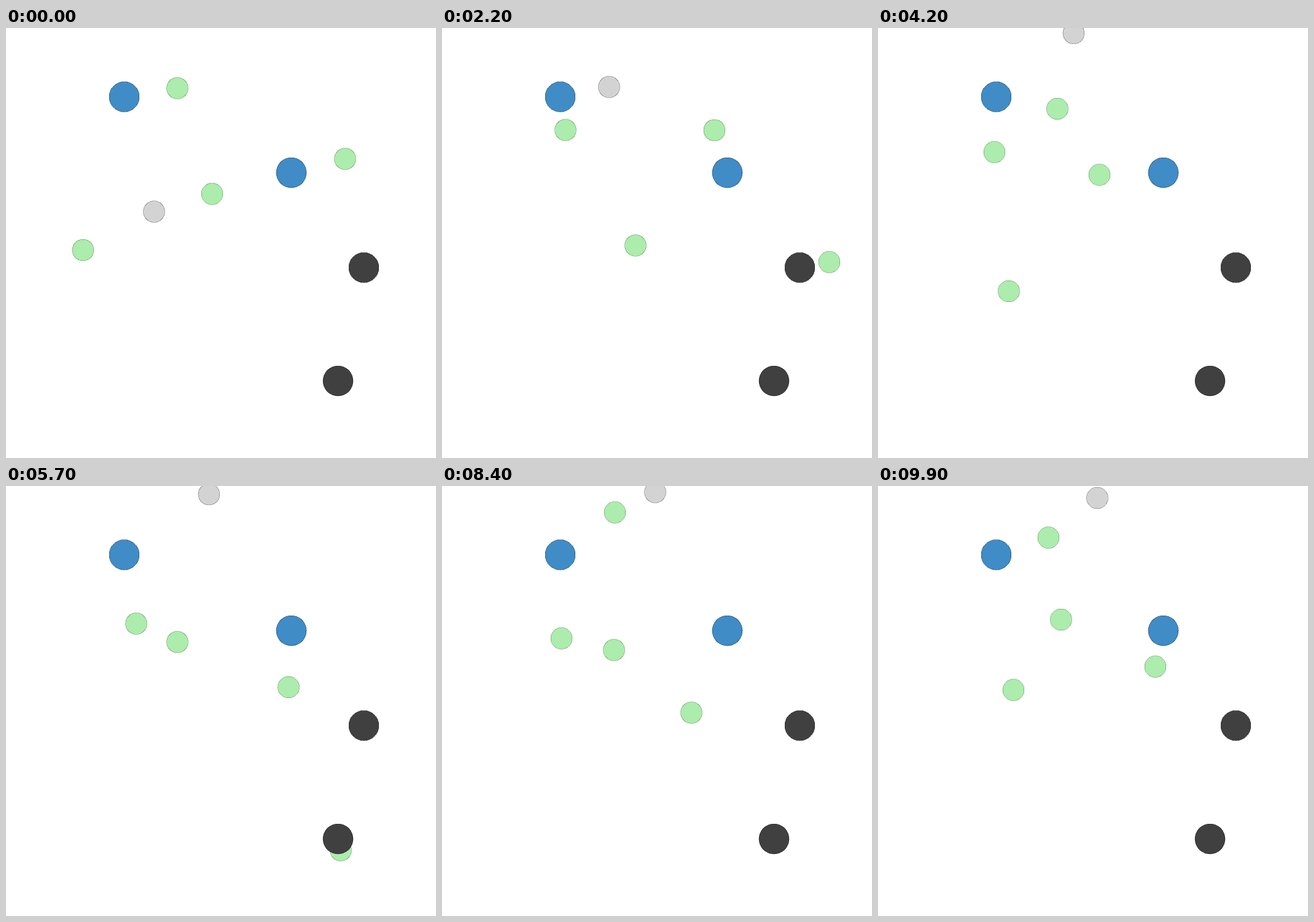
An HTML page that plays this animation: 700x700 px, repeating every 10000 ms.

```html
<!DOCTYPE html>
<html lang="en">
<head>
<meta charset="utf-8">
<title>Moving particles</title>
<style>
  html, body { margin: 0; width: 100%; height: 100%; overflow: hidden; background: #fff; }
  svg { display: block; width: 100vw; height: 100vh; }
  circle { shape-rendering: crispEdges; }
  .runner { fill: rgb(172, 236, 172); stroke: rgba(45, 108, 45, .4); }
  .chaser { fill: rgb(211, 211, 211); stroke: rgba(64, 64, 64, .4); }
  .goal { fill: rgb(64, 140, 199); stroke: rgba(31, 70, 99, .6); }
  .block { fill: rgb(64, 64, 64); stroke: rgba(32, 32, 32, .5); }
</style>
</head>
<body>
<svg id="stage" viewBox="0 0 700 700"></svg>
<script>
const LOOP = 10000, STEP = 100;
const AGENT_RADIUS = 17.5, LANDMARK_RADIUS = 24.5;
const CROWD = [330, 260];
const stage = document.getElementById('stage');

// All agents share these key steps; swing is how far they stray between them.
const keySteps = [0, 22, 42, 57, 70, 84, 99];
const agents = [
  { kind: 'chaser', swing: 0, path: [
    [241, 299], [272, 96], [318.5, 8.5], [330.5, 13.5], [338, 3], [347, 10], [357, 19.5]] },
  { kind: 'runner', swing: 10, path: [
    [279, 98], [201, 166], [189.5, 202], [212, 224], [239, 236.5], [194.5, 248], [298, 217.5]] },
  { kind: 'runner', swing: 50, path: [
    [552, 213], [443.5, 166.5], [292, 131.5], [460, 327.5], [344, 278.5], [280, 267], [451.5, 294]] },
  { kind: 'runner', swing: 150, path: [
    [335.5, 270], [315, 354], [213, 428.5], [545, 593], [428, 200], [406, 369], [220.5, 332]] },
  { kind: 'runner', swing: 150, path: [
    [125.5, 361.5], [630.5, 381], [360.5, 239], [279, 254], [304.5, 473], [281.5, 43], [277.5, 84]] }
];

const landmarks = [
  ['goal', 192.5, 112], ['goal', 464.5, 235.5],
  ['block', 582.5, 390], ['block', 540.5, 574.5]
];

function addCircle(kind, radius, [x, y]) {
  const circle = document.createElementNS('http://www.w3.org/2000/svg', 'circle');
  circle.setAttribute('class', kind);
  circle.setAttribute('r', radius);
  stage.append(circle);
  place(circle, [x, y]);
  return circle;
}

function place(circle, [x, y]) {
  circle.setAttribute('cx', x);
  circle.setAttribute('cy', y);
}

function tangent(path, i, axis) {
  const a = Math.max(i - 1, 0), b = Math.min(i + 1, path.length - 1);
  return (path[b][axis] - path[a][axis]) / (keySteps[b] - keySteps[a]);
}

// A smooth curve through the key points, pushed away from the crowd mid-leg.
function positionAt({ path, swing }, step) {
  const i = Math.max(0, keySteps.findIndex(key => key >= step) - 1);
  const from = path[i], to = path[i + 1], span = keySteps[i + 1] - keySteps[i];
  const u = (step - keySteps[i]) / span, v = 1 - u;
  const outward = CROWD.map((c, axis) => (from[axis] + to[axis]) / 2 - c);
  const push = swing * Math.sin(Math.PI * u) ** 2 / Math.hypot(...outward);
  return outward.map((direction, axis) =>
    from[axis] * v * v * (1 + 2 * u) + to[axis] * u * u * (1 + 2 * v)
    + span * u * v * (v * tangent(path, i, axis) - u * tangent(path, i + 1, axis))
    + push * direction);
}

function render(time) {
  const step = Math.floor((time % LOOP) / STEP);
  for (const agent of agents) place(agent.circle, positionAt(agent, step));
}

for (const agent of agents) agent.circle = addCircle(agent.kind, AGENT_RADIUS, agent.path[0]);
for (const [kind, ...center] of landmarks) addCircle(kind, LANDMARK_RADIUS, center);

const start = performance.now();
function tick(now) {
  render(Math.max(0, now - start));
  requestAnimationFrame(tick);
}
render(0);
requestAnimationFrame(tick);
</script>
</body>
</html>
```
